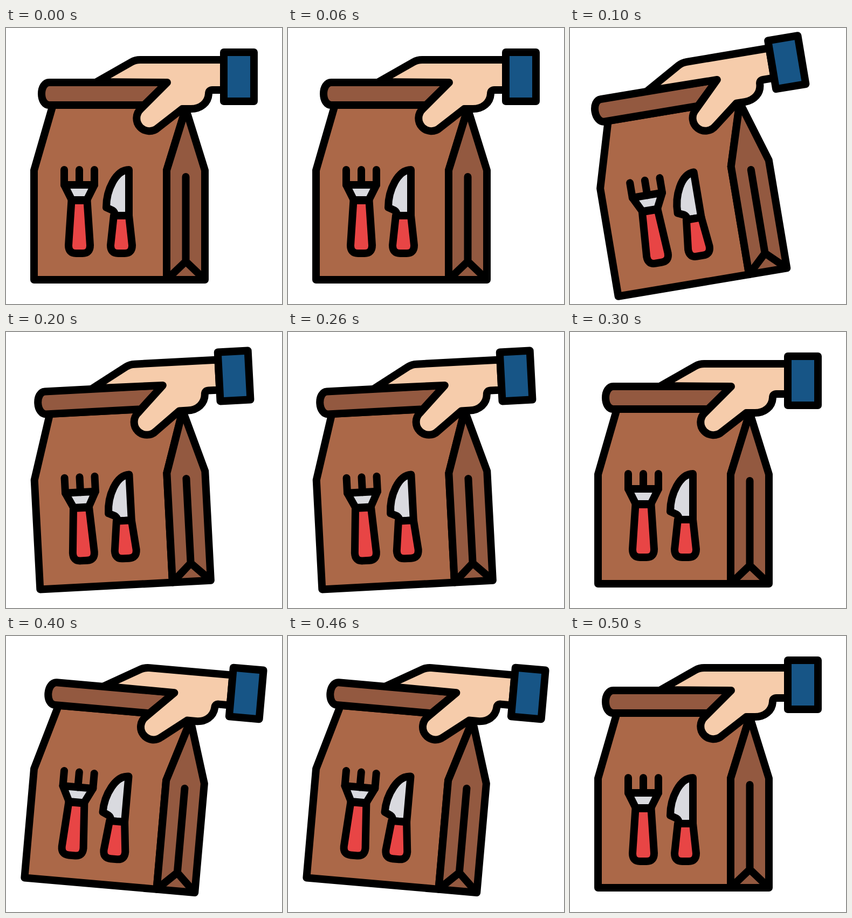
An HTML page for the animation above (0.6 s loop, 512 by 512 pixels).

```html
<!DOCTYPE html>
<html lang="en">
<head>
<meta charset="utf-8">
<title>Takeaway bag</title>
<style>
  html, body { margin: 0; height: 100%; overflow: hidden; background: #fff; }
  svg { display: block; width: 100vw; height: 100vh; }
  #art { stroke: #000; stroke-width: 14; stroke-linecap: round; stroke-linejoin: round; fill: none; }
  .front { fill: #ab6848; }
  .side { fill: #935940; }
  .skin { fill: #f6ccab; }
  .cuff { fill: #175586; }
  .steel { fill: #d9dadf; }
  .red { fill: #e84545; }
</style>
</head>
<body>
<svg viewBox="0 0 512 512">
  <g id="art">
    <!-- bag -->
    <path class="front" d="M87 143 L52 264 V467 H298 V264 L333 150 V143 Z"/>
    <path class="side" d="M298 264 L333.5 150 L369 264 V467 H298 Z"/>
    <path d="M333.5 276 V433 M300 465 L333.5 433 L367 465"/>
    <!-- rolled top -->
    <path class="side" d="M299 101 H80 C72 101 66 110 66 122 S72 143 80 143 H256 Z"/>
    <!-- hand and sleeve -->
    <path class="skin" d="M168 100 L233 63 Q240 59 249 59 H404 V115 H383 Q376 115 376 122 C375 139 361 150 343 150 H327 L282 185 A23.5 23.5 0 0 1 250 150 L299 101 Z"/>
    <rect class="cuff" x="404" y="45" width="56" height="91"/>
    <!-- fork -->
    <path class="steel" d="M108 291 H164 L150 319 H122 Z"/>
    <path d="M108 263 V291 M136 263 V291 M164 263 V291"/>
    <path class="red" d="M121.5 320 L116 403 Q116 418 130 418 H142 Q156 418 156 403 L150.500 320 Z"/>
    <!-- knife -->
    <path class="steel" d="M228 263 C204 263 186 300 186 333 L197 338 Q202 341 202 348 H228 Z"/>
    <path class="red" d="M200 348 L194 403 Q194 418 208 418 H220 Q234 418 234 403 L228 348 Z"/>
  </g>
</svg>
<script>
  const art = document.getElementById("art");
  const angles = [0, -9.5, -3, 0, 5, 0]; // swing in degrees, one pose per step
  const step = 100;

  function draw() {
    const i = Math.floor(performance.now() / step) % angles.length;
    art.setAttribute("transform", `rotate(${angles[i]} 256 256)`);
    requestAnimationFrame(draw);
  }
  draw();
</script>
</body>
</html>
```
